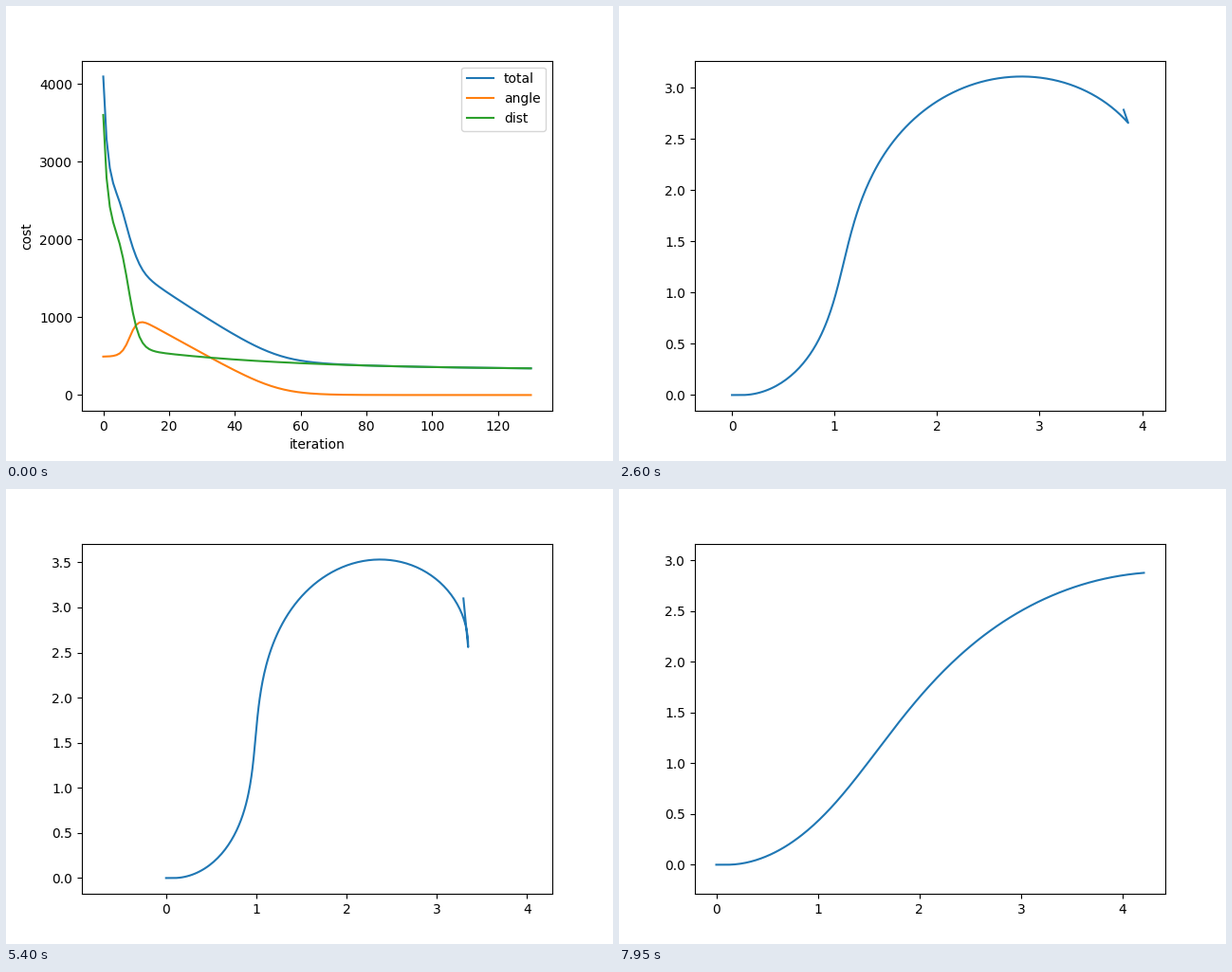
Animation, 640 px wide and 480 px high, one loop 8 s. Source, as a matplotlib script:

```python
import numpy as np
import matplotlib.pyplot as plt
from matplotlib.animation import FuncAnimation

ITERS = 131
FRAMES = 160

# iteration, turning point x and y, steering a, decay k, bias b, reverse dx and dy
STAGES = np.array([
    (0,   0.00, 0.00,  3.8, 2.0, -.07, 0, 0),
    (4,   2.905, .09,  3.8, 2.0, -.07, 0, 0),
    (9,   3.30, 1.37,  3.8, 2.0, -.07, 0, 0),
    (14,  3.985, 2.73, 3.8, 2.0, -.07, 0, 0),
    (27,  4.21, 2.875, 7.1, 2.0, .88, 0, 0),
    (34,  4.185, 2.84, 8.6, 2.0, 1.35, 0, 0),
    (69,  3.51, 2.515, 15.8, 1.9, 3.89, -.093, .33),
    (107, 3.347, 2.56, 15.7, 1.5, 5.09, -.052, .54),
    (130, 3.33, 2.57,  15.7, 1.5, 5.09, -.045, .59),
])


def blend(it):
    """Stage parameters at an iteration, by cubics that never overshoot."""
    x, y = STAGES[:, 0], STAGES[:, 1:]
    h = np.diff(x)[:, None]
    d = np.diff(y, axis=0) / h
    prod, total = d[:-1] * d[1:], d[:-1] + d[1:]
    inner = np.where(prod > 0, 2 * prod / np.where(total == 0, 1, total), 0)
    m = np.vstack([d[:1], inner, d[-1:]])
    i = min(np.searchsorted(x, it, side="right") - 1, len(h) - 1)
    t = (it - x[i]) / h[i]
    return (y[i] + t * t * (3 - 2 * t) * (y[i + 1] - y[i])
            + t * (1 - t) * h[i] * ((1 - t) * m[i] - t * m[i + 1]))


def path(it, n=200):
    """Straight start, a steered arc to the turning point, then a reverse."""
    x, y, a, k, b, back_x, back_y = blend(it)
    s = (np.arange(n) + .5) / n
    heading = s * (a * np.exp(-k * s) - b)
    along, up = np.cumsum(np.cos(heading)), np.cumsum(np.sin(heading))
    start = .025 * x
    px = np.r_[0, start, start + (x - start) * along / along[-1]]
    py = np.r_[0, 0, y * up / up[-1]]
    if back_y > 0:
        px, py = np.r_[px, x + back_x], np.r_[py, y + back_y]
    return px, py


def sigmoid(v):
    return 1 / (1 + np.exp(-v))


its = np.arange(ITERS)
dist = (1408 * np.exp(-.82 * its) + 1560 * sigmoid(.62 * (7.65 - its))
        + 325 + 320 * np.exp(-its / 45))
fall = 131 * np.log1p(np.exp((53 - its) / 5.6))
angle = 493 + (fall - 493) * sigmoid(.8 * (its - 8.3))

fig = plt.figure(figsize=(6.4, 4.8), dpi=100)


def update(n):
    fig.clear()
    ax = fig.add_subplot()
    if n == 0:
        ax.plot(its, dist + angle, label="total")
        ax.plot(its, angle, label="angle")
        ax.plot(its, dist, label="dist")
        ax.set_xlabel("iteration")
        ax.set_ylabel("cost")
        ax.legend(loc="upper right")
    else:
        ax.plot(*path((n - 1) % ITERS))
        ax.axis("equal")
    return []


anim = FuncAnimation(fig, update, frames=FRAMES, interval=50, repeat=True,
                     repeat_delay=0, blit=False)
plt.show()
```
